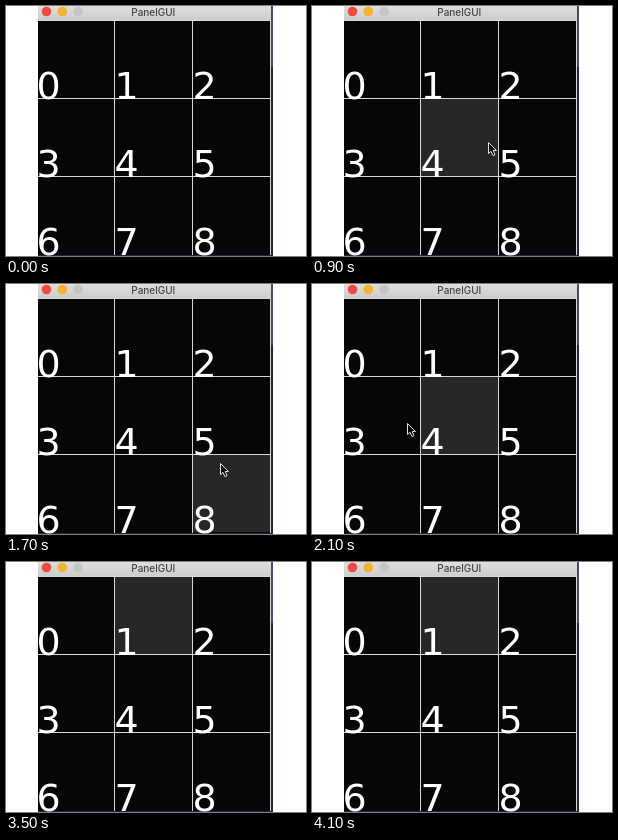
Write an HTML page that moves like this. It is 300 by 250 pixels and loops after 5.4 s.

```html
<!DOCTYPE html>
<html lang="en">
<head>
<meta charset="utf-8">
<title>PanelGUI</title>
<style>
  html, body { margin: 0; width: 100%; height: 100%; overflow: hidden; background: #fff; }
  svg { display: block; width: 300px; height: 250px; }
  .digit { font: 38px "DejaVu Sans", sans-serif; fill: #fff; }
  .title { font: 500 10px Inter, sans-serif; fill: #454545; text-anchor: middle; }
</style>
</head>
<body>
<svg viewBox="0 0 300 250">
  <defs>
    <linearGradient id="bar" x2="0" y2="1">
      <stop offset="0" stop-color="#dedede"/>
      <stop offset="1" stop-color="#cdcdcd"/>
    </linearGradient>
    <clipPath id="frame"><path d="M32 0H267V250H32Z"/></clipPath>
  </defs>
  <g clip-path="url(#frame)">
    <rect x="32" width="235" height="250" fill="#26233c"/>
    <rect x="265" width="2" height="61" fill="#4b4775"/>
    <rect x="32" width="233" height="249" fill="#060606"/>
    <g id="cells"></g>
    <path id="lines" stroke="#d8d8d8" fill="none"/>
    <g id="digits"></g>
    <rect x="32" width="233" height="14" fill="url(#bar)"/>
    <g id="buttons"></g>
    <text class="title" x="147.3" y="9.5">PanelGUI</text>
    <path id="pointer" d="M.5 .5V11.6L3 9.3L4.9 13.6L7 12.7L5.2 8.5H8.4Z"
          fill="#080808" stroke="#e4e4e4" stroke-linejoin="round"/>
  </g>
</svg>
<script>
const LOOP = 5400, STEP = 100, SIZE = 78, LEFT = 30, TOP = 14;

// Turning points of the pointer's tour
const path = [
  { t: 300, x: 238, y: 32 },
  { t: 700, x: 84, y: 58 },
  { t: 900, x: 176, y: 136 },
  { t: 1300, x: 62, y: 213 },
  { t: 1600, x: 204, y: 206 },
  { t: 1800, x: 224, y: 152 },
  { t: 2100, x: 95, y: 139 },
  { t: 2900, x: 65, y: 142 },
  { t: 3100, x: 70, y: 70 },
  { t: 3400, x: 161, y: 8 }
];
const ENTER = path[0].t, LAST = path.at(-1).t;

const $ = id => document.getElementById(id);
function add(parent, tag, attrs, text = "") {
  const el = document.createElementNS("http://www.w3.org/2000/svg", tag);
  for (const key in attrs) el.setAttribute(key, attrs[key]);
  el.textContent = text;
  return parent.appendChild(el);
}

["#ea4b42", "#f2b233", "#c6c6c6"].forEach((fill, i) =>
  add($("buttons"), "circle", { cx: 40.5 + i * 15.8, cy: 5.5, r: 4.8, fill }));

const cells = [];
for (let i = 0; i < 9; i++) {
  const x = LEFT + i % 3 * SIZE, y = TOP + Math.floor(i / 3) * SIZE;
  cells.push(add($("cells"), "rect", { x, y, width: SIZE, height: SIZE, fill: "#272727" }));
  add($("digits"), "text", { class: "digit", x: x + .4, y: y + SIZE + 1 }, i);
}

let grid = "";
for (let i = 0; i < 3; i++) {
  const d = i * SIZE + .5;
  grid += `M${LEFT + SIZE + d} 14V249M32 ${TOP + d}H265`;
}
$("lines").setAttribute("d", grid);

const mix = (a, b, k) => a + (b - a) * k;

function pointerAt(t) {
  if (t < ENTER || t > LAST) return null;
  const n = Math.max(1, path.findIndex(p => p.t >= t));
  const a = path[n - 1], b = path[n], k = (t - a.t) / (b.t - a.t);
  return { x: mix(a.x, b.x, k), y: mix(a.y, b.y, k) };
}

// The highlight trails the pointer by one step and stays after it leaves.
function hoveredAt(t) {
  const p = pointerAt(Math.min(t - STEP, LAST));
  if (!p) return -1;
  const index = (v, from) => Math.max(0, Math.min(2, Math.floor((v - from) / SIZE)));
  return index(p.y, TOP) * 3 + index(p.x, LEFT);
}

function draw(time) {
  const t = Math.floor(time % LOOP / STEP) * STEP;
  const p = pointerAt(t), hot = hoveredAt(t);
  const show = (el, on) => el.setAttribute("visibility", on ? "visible" : "hidden");
  cells.forEach((cell, i) => show(cell, i === hot));
  show($("pointer"), p);
  if (p) $("pointer").setAttribute("transform", `translate(${p.x} ${p.y})`);
}

const start = performance.now();
function tick() {
  draw(performance.now() - start);
  requestAnimationFrame(tick);
}
tick();
</script>
</body>
</html>
```
